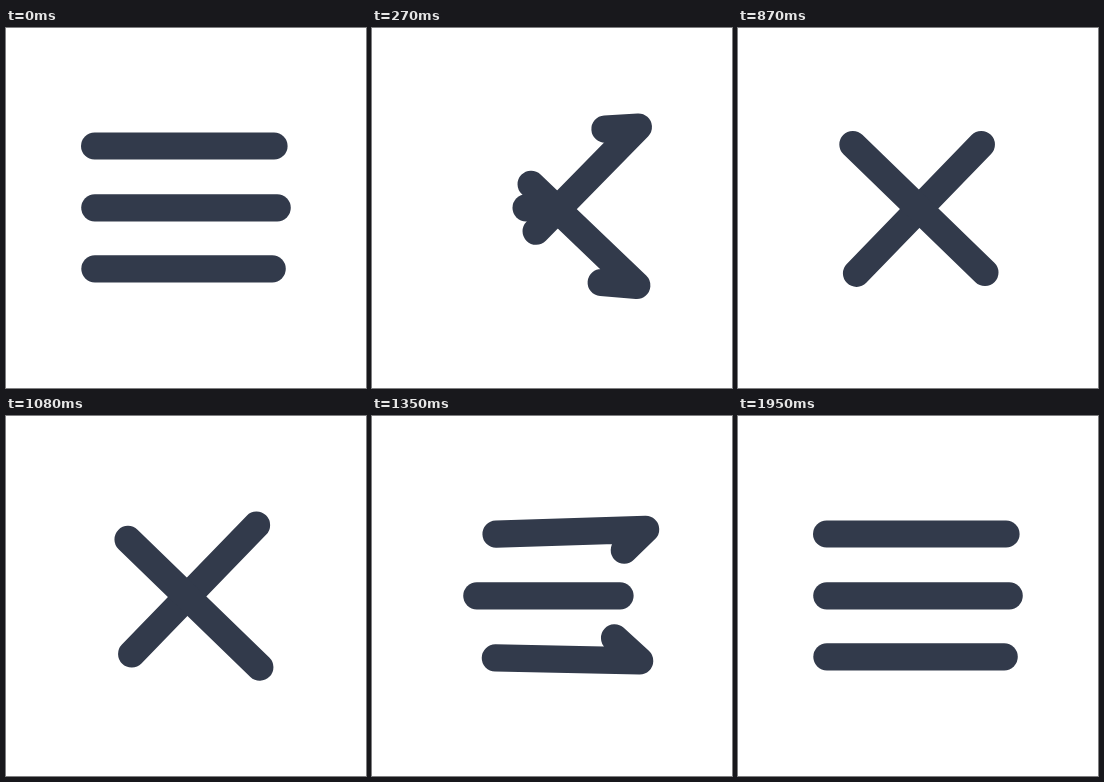
Animation, 360 px wide and 360 px high, one loop 1.98 s. Source, as an HTML page:

```html
<!DOCTYPE html>
<html lang="en">
<head>
<meta charset="utf-8">
<title>Menu icon</title>
<style>
  html, body { margin: 0; width: 100%; height: 100%; overflow: hidden; background: #fff; }
  svg { display: block; width: 100vw; height: 100vh; }
  path { fill: none; stroke: #323a4b; stroke-width: 27.2; stroke-linecap: round; stroke-linejoin: round; }
</style>
</head>
<body>
<svg viewBox="0 0 360 360"><path id="mid"/><path id="top"/><path id="low"/></svg>
<script>
const LOOP = 1980, STEP = 30, MOVE = 540;
const $ = id => document.getElementById(id);
const mix = (a, b, k) => a + (b - a) * k;

// Each bar slides round a corner that drifts between two points.
// lead: gap from the bar's end to the corner at rest; side: 1 turns down, -1 turns up.
const top_ = { from: [276, 118], to: [264.3, 94.9], lead: 8, travel: 217.5,
  length: 179.4, grow: 0, tilt: .07, bend: .5, angle: 45.9, side: 1 };
const low = { from: [268.6, 240.8], to: [264, 261], lead: 2.4, travel: 210,
  length: 177.3, grow: 6.5, tilt: .1, bend: 1, angle: 44.1, side: -1 };

// cubic-bezier(x1, 0, x2, 1)
function ease(u, x1, x2) {
  if (u <= 0) return 0;
  if (u >= 1) return 1;
  let lo = 0, hi = 1, p;
  for (let i = 0; i < 30; i++) {
    p = (lo + hi) / 2;
    const q = 1 - p, x = 3 * q * q * p * x1 + 3 * q * p * p * x2 + p ** 3;
    if (x < u) lo = p; else hi = p;
  }
  return p * p * (3 - 2 * p);
}

function slide(bar, p) {
  const { from, to, side } = bar;
  const m = Math.min(1, p / .86);   // the corner rests once the bar has passed it
  const x = mix(from[0], to[0], m), y = mix(from[1], to[1], m);
  const slope = bar.tilt * m ** bar.bend;
  const a = (bar.angle - 2 * (1 - m)) * Math.PI / 180;
  const at = d => d < 0
    ? `${x + d} ${y - side * d * slope}`
    : `${x - d * Math.cos(a)} ${y + side * d * Math.sin(a)}`;
  const head = p * bar.travel - bar.lead;
  const tail = head - bar.length - bar.grow * p;
  const corner = tail < 0 && head > 0 ? `L${at(0)}` : '';
  return `M${at(tail)}${corner}L${at(head)}`;
}

function draw(now) {
  const t = Math.floor(now % LOOP / STEP) * STEP;
  const p = ease((t - 30) / MOVE, .393, .186) - ease((t - 930) / MOVE, .837, .585);
  const left = mix(88.8, 181, p);
  const right = Math.max(182, 271.2 - 320 * p ** 1.5);

  $('top').setAttribute('d', slide(top_, p));
  $('low').setAttribute('d', slide(low, p));
  $('mid').setAttribute('d', `M${left} 179.8H${right}`);
}

const start = performance.now();
function tick() {
  draw(performance.now() - start);
  requestAnimationFrame(tick);
}
tick();
</script>
</body>
</html>
```
